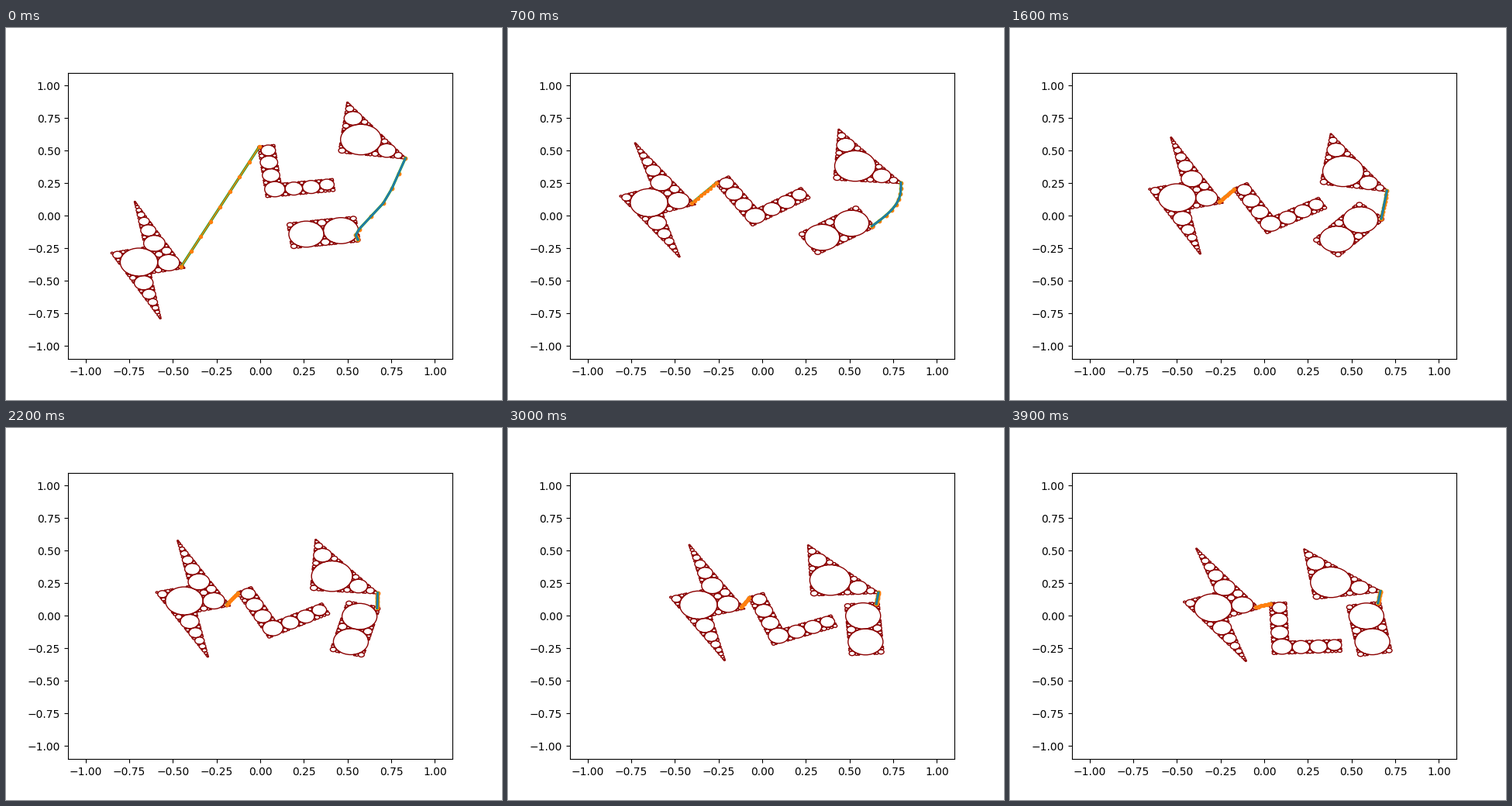
A matplotlib script that plays this animation: 640 px wide and 480 px high, repeating every 4 s.

```python
import numpy as np
import matplotlib.pyplot as plt
from matplotlib.animation import FuncAnimation
from matplotlib.collections import EllipseCollection
from matplotlib.path import Path

FRAMES = 40
KEY_TIMES = np.array([0, 7, 16, 26, 39])
MIN_RADIUS = 0.0036
GRID_STEP = 0.002
DOTS = 9


def clearance(pts, poly, circles):
    """Distance from each point to the nearest edge or placed circle."""
    best = np.full(len(pts), np.inf)
    for a, b in zip(poly, np.roll(poly, -1, axis=0)):
        edge = b - a
        t = np.clip((pts - a) @ edge / (edge @ edge), 0, 1)
        gap = pts - a - t[:, None] * edge
        best = np.minimum(best, np.hypot(gap[:, 0], gap[:, 1]))
    for x, y, r in circles:
        best = np.minimum(best, np.hypot(pts[:, 0] - x, pts[:, 1] - y) - r)
    return best


def refine(point, poly, circles):
    side = np.linspace(-1, 1, 5)
    offsets = np.stack(np.meshgrid(side, side), -1).reshape(-1, 2)
    step = GRID_STEP
    for _ in range(7):
        near = point + step * offsets
        point = near[np.argmax(clearance(near, poly, circles))]
        step *= 0.6
    return point


def pack(poly, seeds):
    """Fill a polygon greedily with the largest circles that still fit."""
    poly = np.array(poly, float)
    circles = []
    for seed in np.array(seeds, float):
        r = clearance(seed[None], poly, circles)[0]
        circles.append((*seed, r))

    low, high = poly.min(axis=0), poly.max(axis=0)
    axes = [np.arange(a, b, GRID_STEP) for a, b in zip(low, high)]
    pts = np.stack(np.meshgrid(*axes), -1).reshape(-1, 2)
    pts = pts[Path(poly).contains_points(pts)]
    room = clearance(pts, poly, circles)
    while len(circles) < 250:
        keep = room > MIN_RADIUS * 0.6
        pts, room = pts[keep], room[keep]
        if not len(pts):
            break
        best = np.argmax(room)
        point = refine(pts[best], poly, circles)
        r = clearance(point[None], poly, circles)[0]
        if r < MIN_RADIUS:
            room[best] = 0
            continue
        circles.append((*point, r))
        dist = np.hypot(*(pts - point).T) - r
        room = np.minimum(room, dist)
    return np.array(circles)


def star():
    """Point-symmetric, so three corners give all six."""
    mid = np.array([0.052, -0.0045])
    half = np.array([(0.0816, 0.4715), (0.182, -0.1295), (-0.016, -0.104)])
    return pack(np.vstack([mid + half, mid - half]), [(0, 0)])


def ell():
    c = 0.1 * (2 - np.sqrt(2))
    poly = np.array([(0, 0), (.4, 0), (.4, .1), (.1, .1), (.1, .4), (0, .4)])
    first = c + np.sqrt((c + .05)**2 - (c - .05)**2)
    arm = [(first + i * .1, .05) for i in range(2)]
    seeds = np.array([(c, c)] + arm + [(y, x) for x, y in arm])
    return pack(poly - c, seeds - c)


def triangle():
    r = 0.4 - 0.2 * np.sqrt(2)
    return pack(np.array([(0, 0), (.4, 0), (0, .4)]) - r, [(0, 0)])


def box():
    return pack([(-.1, -.2), (.1, -.2), (.1, .2), (-.1, .2)], [(0, .1), (0, -.1)])


def glide(*keys):
    """Shape-preserving cubic with a fast start, sampled at every frame."""
    keys = np.array(keys, float)
    h = np.diff(KEY_TIMES)[:, None]
    d = np.diff(keys, axis=0) / h
    same = d[:-1] * d[1:] > 0
    total = np.where(same, d[:-1] + d[1:], 1)
    inner = np.where(same, 2 * d[:-1] * d[1:] / total, 0)
    m = np.vstack([1.7 * d[:1], inner, d[-1:]])
    out = []
    for n in range(FRAMES):
        i = min(np.searchsorted(KEY_TIMES, n, side="right") - 1, len(h) - 1)
        w = h[i, 0]
        u = (n - KEY_TIMES[i]) / w
        out.append((2 * u**3 - 3 * u**2 + 1) * keys[i]
                   + (3 * u**2 - 2 * u**3) * keys[i + 1]
                   + w * u * (1 - u)**2 * m[i]
                   + w * u**2 * (u - 1) * m[i + 1])
    return np.array(out)


def to_stage(local, pose):
    x, y, deg = pose
    c, s = np.cos(np.radians(deg)), np.sin(np.radians(deg))
    return np.asarray(local) @ np.array([[c, s], [-s, c]]) + (x, y)


# x, y and angle in degrees
star_pose = glide((-.694, -.355, 19.6), (-.648, .101, 26.5), (-.499, .139, 20.9),
                  (-.399, .095, 21.8), (-.293, .062, 28.5))
ell_pose = glide((.084, .205, 7), (-.040, 0, 33), (.036, -.060, 29.6),
                 (.087, -.120, 26), (.102, -.236, 2.5))
triangle_pose = glide((.577, .586, -7.2), (.532, .383, -4), (.452, .342, -8.7),
                      (.395, .285, 0), (.382, .258, 8.6))
box_pose = glide((.363, -.127, -82.3), (.427, -.111, -57.2), (.484, -.105, -42),
                 (.573, -.100, 0), (.602, -.100, 9.8))

# where the two strings hold on to the bodies
STAR_HOOK, ELL_HOOK = (.217, -.113), (-.050, .333)
TRIANGLE_HOOK, BOX_HOOK = (.270, -.110), (.082, .187)
START_BENDS = [(.727, .13), (.543, -.135)]


def spread(points):
    """Evenly indexed dots along a polyline."""
    points = np.array(points)
    s = np.linspace(0, len(points) - 1, DOTS)
    return np.stack([np.interp(s, range(len(points)), p) for p in points.T], -1)


def left_string(n):
    return spread([to_stage(ELL_HOOK, ell_pose[n]),
                   to_stage(STAR_HOOK, star_pose[n])])


def right_string(n):
    """A kinked string that turns into an arc, then pulls straight."""
    a = to_stage(TRIANGLE_HOOK, triangle_pose[n])
    b = to_stage(BOX_HOOK, box_pose[n])
    kink = max(0, 1 - n / 6)
    dots = kink * spread([a, *START_BENDS, b]) + (1 - kink) * spread([a, b])
    bulge = .055 * np.sin(np.pi * min(n / 14, 1))
    dots[:, 0] += bulge * np.sin(np.pi * np.linspace(0, 1, DOTS))
    return dots


fig, ax = plt.subplots(figsize=(6.4, 4.8), dpi=100)
ax.set_xlim(-1.1, 1.1)
ax.set_ylim(-1.1, 1.1)


def add_rings(circles):
    size = 2 * circles[:, 2]
    rings = EllipseCollection(size, size, np.zeros(len(size)), units="xy",
                              offsets=circles[:, :2],
                              offset_transform=ax.transData,
                              facecolors="none", edgecolors="darkred",
                              linewidths=1, zorder=1)
    ax.add_collection(rings, autolim=False)
    return rings


def add_line(style, color, lw, ms=0):
    return ax.plot([], [], style, color=color, lw=lw, ms=ms)[0]


bodies = [(add_rings(circles), circles[:, :2], pose) for circles, pose in (
    (star(), star_pose), (ell(), ell_pose),
    (triangle(), triangle_pose), (box(), box_pose))]
left_lines = [add_line("-", "C2", 2.5), add_line("o-", "C1", 1, 2.9)]
right_lines = [add_line("o", "C1", 0, 3.2), add_line("-", "C2", 2.4),
               add_line("-", "C0", 1.6)]


def update(n):
    for rings, centres, pose in bodies:
        rings.set_offsets(to_stage(centres, pose[n]))
    for lines, string in ((left_lines, left_string), (right_lines, right_string)):
        for line in lines:
            line.set_data(*string(n).T)
    return [body[0] for body in bodies] + left_lines + right_lines


anim = FuncAnimation(fig, update, frames=FRAMES, interval=100,
                     repeat=True, repeat_delay=0)
plt.show()
```
